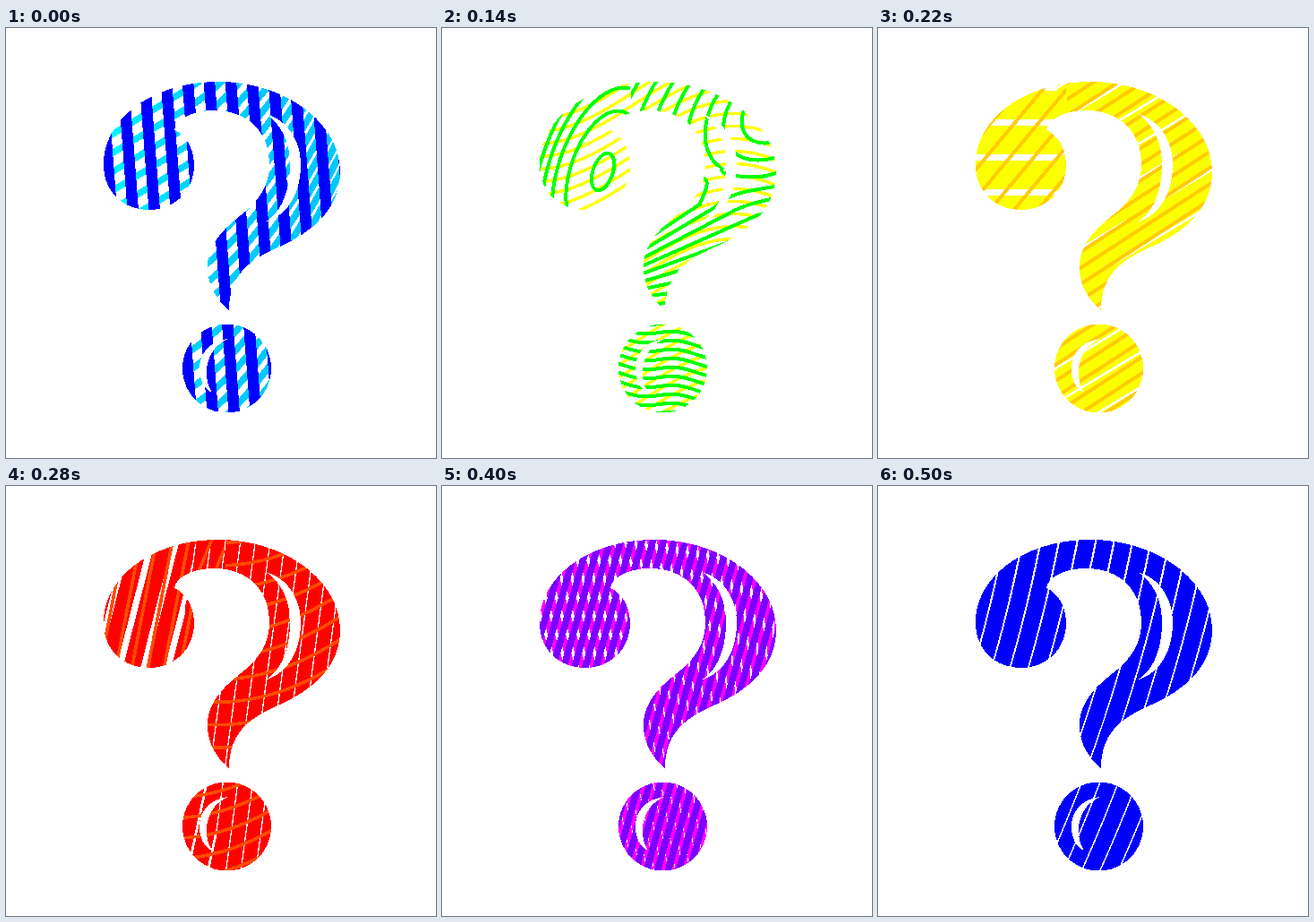
An HTML page with a canvas that plays this animation: 480 px wide and 480 px high, repeating every 520 ms.

```html
<!DOCTYPE html>
<html lang="en">
<head>
<meta charset="utf-8">
<title>Striped question mark</title>
<style>
html, body { margin: 0; height: 100%; overflow: hidden; background: #fff; }
canvas { display: block; }
</style>
</head>
<body>
<canvas id="stage" width="480" height="480"></canvas>
<script>
const SIZE = 480, STEP = 20, STEPS = 26;
const ctx = document.getElementById('stage').getContext('2d', { willReadFrequently: true });
const { hypot, max, min, abs, round, sin, cos, log } = Math;
const clamp = (v, low = 0, high = 1) => max(low, min(high, v));
const lerp = (a, b, t) => a + (b - a) * t;

const mark = new Path2D(
  'M249 316C232 300 224 284 225 264C227 238 246 222 262 209C282 194 294 176 294 152' +
  'C294 116 270 92 232 92C208 92 190 102 188 114C200 119 210 134 210 153' +
  'C210 182 188 203 160 203C130 203 109 182 109 153C109 100 165 60 237 60' +
  'C312 60 373 106 373 160C373 200 346 224 312 241C280 256 249 268 249 316Z' +
  'M290 96C318 104 329 130 329 152C329 186 314 209 289 217C310 204 317 178 317 152C317 128 308 108 290 96Z' +
  'M197 380a49.5 49.5 0 1 0 99 0a49.5 49.5 0 1 0 -99 0Z' +
  'M248 347C226 350 216 364 216 381C216 394 222 403 230 407C225 398 224 392 224 384C224 368 232 354 248 347Z');

const inDot = y => y > 322;
const inBall = (x, y) => x < 211 && !inDot(y);

// Stripes lie where a field crosses whole numbers.
function widening(x, y) {
  const fan = 0.0015 * (y - 75);
  const u = x - fan * clamp((x - 222) / (1 + fan), -10, 70) - 238;
  return u < 0 ? u / 8.55 : log(1 + 0.014 * u) / 0.12;
}

function contours(x, y) {
  if (inBall(x, y)) {
    return (hypot((x - 179 + 0.25 * (y - 160)) / 0.55, y - 160) ** 2 - 420) / 4200;
  }
  if (inDot(y)) return (y + 3 * cos((x - 262) / 13) - 0.1 * (x - 246)) / 10;
  const rings = hypot(x - 375 + 0.4 * (y - 90), y - 90) / 19;
  const spread = 0.0085 * (x - 228);
  const fan = ((y + 315 * spread) / (1 + spread) - 245) / 9 + 5;
  return lerp(rings, fan, clamp((y - 160 + 0.2 * (330 - x)) / 45));
}

function bowls(x, y) {
  if (inBall(x, y) || (x < 245 && y < 100)) return (x - 0.13 * y) / 13.5;
  return inDot(y)
    ? (y - 391 + 0.007 * (x - 265) ** 2) / 31
    : (y - 138 + 0.008 * (x - 332) ** 2) / 43;
}

function bend(x, y) {
  const u = x - 0.09 * y;
  return min(u, 200) / 13.5 + max(0, u - 200) / 9.5;
}

const layer = (field, width, hue, spread = 0, dark = 0) => ({ field, width, hue, spread, dark });

const keys = [
  { at: 0, layers: [
    layer((x, y) => (x - 0.075 * y - 222) / 24, 12.5, 240),
    layer((x, y) => (y + 0.6 * x + 0.004 * max(0, x - 200) ** 2) / 21, 7.5, 180, 13)] },
  { at: 3, layers: [
    layer(widening, 4.8, 222, 18, 0.35),
    layer((x, y) => (y + 0.5 * x) / 20, 0, 150)] },
  { at: 7, layers: [
    layer(contours, 4, 120),
    layer((x, y) => (y + 45 * sin((x - 215) / 70)) / 14, 3.5, 60)] },
  { at: 11, layers: [
    layer((x, y) => (y - 105 + 0.6 * max(0, x - 200)) / 39 + 0.5, 32, 61),
    layer((x, y) => inBall(x, y) ? (y + 1.2 * x) / 32 : (y + 0.65 * x) / 18, 4, 48)] },
  { at: 17, layers: [
    layer(bend, 6.3, -60),
    layer(bowls, 3.2, -12)] },
  { at: 20, layers: [
    layer((x, y) => (x + 0.28 * y) / 12, 7.5, -91),
    layer((x, y) => (x - 0.3 * y + 0.0012 * max(0, x - 200) * y) / 12, 7.5, -60)] },
  { at: 25, layers: [
    layer((x, y) => (x + 0.15 * y + 0.00035 * y * y - 212) / 20.5 + 0.5, 17.9, -120),
    layer((x, y) => (x - 0.2 * y) / 14, 0, -100)] }
];

function sample(field) {
  const values = new Float32Array(SIZE * SIZE);
  for (let i = 0; i < values.length; i++) values[i] = field(i % SIZE, i / SIZE | 0);
  return values;
}
for (const key of keys) for (const l of key.layers) l.values = sample(l.field);

ctx.fill(mark, 'evenodd');
const inside = [];
ctx.getImageData(0, 0, SIZE, SIZE).data.forEach((v, i) => {
  if (i % 4 === 3 && v > 127) inside.push(i >> 2);
});

function rgb(hue, value) {
  const h = ((hue % 360) + 360) % 360 / 60;
  return [0, 4, 2].map(n => round(255 * value * clamp(abs((h + n) % 6 - 3) - 1)));
}

function paint(pixels, a, b, t) {
  const mix = name => lerp(a[name], b[name], t);
  const half = mix('width') / 2, hue = mix('hue'), spread = mix('spread'), dark = mix('dark');
  const colors = Array.from({ length: SIZE }, (_, x) => {
    const ramp = 1 - (1 - clamp((x - 110) / 250)) ** 3;
    return rgb(hue + spread * ramp, 1 - dark * clamp((x - 180) / 190));
  });
  const phase = i => lerp(a.values[i], b.values[i], t);
  for (const i of inside) {
    const u = phase(i);
    const steepness = hypot(phase(i + 1) - u, phase(i + SIZE) - u);
    const isSeam = steepness > 0.4;
    if (!isSeam && abs(u - round(u)) < min(0.46, half * steepness)) {
      pixels.set(colors[i % SIZE], i * 4);
    }
  }
}

function draw(step) {
  const next = max(1, keys.findIndex(k => k.at >= step));
  const from = keys[next - 1], to = keys[next];
  const t = (step - from.at) / (to.at - from.at);
  const image = ctx.createImageData(SIZE, SIZE);
  image.data.fill(255);
  const order = step > 8 && step < 19 ? [0, 1] : [1, 0];
  for (const n of order) paint(image.data, from.layers[n], to.layers[n], t);
  ctx.putImageData(image, 0, 0);
}

let shown = -1;
function tick() {
  const step = Math.floor(performance.now() / STEP) % STEPS;
  if (step !== shown) draw(shown = step);
  requestAnimationFrame(tick);
}
tick();
</script>
</body>
</html>
```
